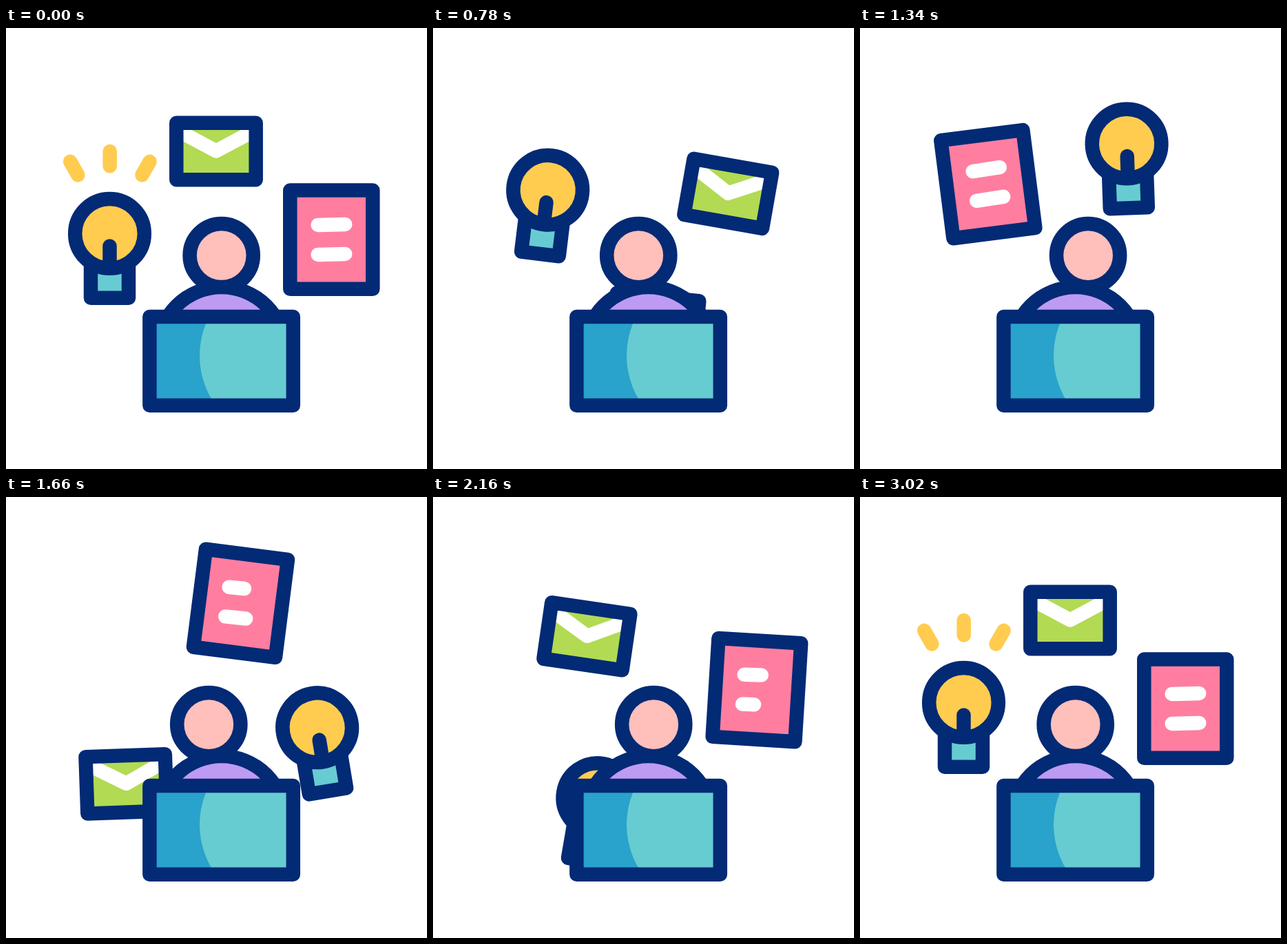
An HTML page with a canvas that plays this animation: 611x640 px, repeating every 3.42 s.

```html
<!DOCTYPE html>
<html lang="en">
<head>
<meta charset="utf-8">
<title>Juggling tasks</title>
<style>
html, body { margin: 0; width: 100%; height: 100%; overflow: hidden; background: #fff; }
canvas { display: block; width: 611px; height: 640px; }
</style>
</head>
<body>
<canvas id="stage"></canvas>
<script>
const W = 611, H = 640, LOOP = 3420, STEP = 20, STROKE = 20.5;
const ORBIT = 154.5, ORBIT_TIME = 2400;
const C = {
  navy: '#032a75', yellow: '#ffcc50', green: '#b2da53', teal: '#67ccd1',
  blue: '#29a2cc', pink: '#ff7ea0', skin: '#ffbfba', purple: '#bd9bf3', white: '#fff'
};
const canvas = document.getElementById('stage');
const ctx = canvas.getContext('2d');
const dpr = window.devicePixelRatio || 1;
canvas.width = Math.round(W * dpr);
canvas.height = Math.round(H * dpr);

const ease = u => {
  u = Math.min(1, Math.max(0, u));
  return u * u * (3 - 2 * u);
};

// Eased value through [time, value] keys
function keyed(t, keys) {
  for (let i = 1; i < keys.length; i++) {
    const [t0, v0] = keys[i - 1], [t1, v1] = keys[i];
    if (t < t1) return v0 + (v1 - v0) * ease((t - t0) / (t1 - t0));
  }
  return keys[keys.length - 1][1];
}

function paint(fill, stroke = C.navy) {
  if (fill) {
    ctx.fillStyle = fill;
    ctx.fill();
  }
  if (stroke) {
    ctx.strokeStyle = stroke;
    ctx.stroke();
  }
}

function rect(x, y, w, h, fill, stroke) {
  ctx.beginPath();
  ctx.rect(x, y, w, h);
  paint(fill, stroke);
}

function circle(x, y, r, fill, stroke) {
  ctx.beginPath();
  ctx.arc(x, y, r, 0, Math.PI * 2);
  paint(fill, stroke);
}

function line(color, ...points) {
  ctx.beginPath();
  points.forEach(([x, y]) => ctx.lineTo(x, y));
  paint(null, color);
}

// Draws the part of a line between fractions a and b
function trimmed(color, [x0, y0], [x1, y1], a, b) {
  if (b - a < 0.002) return;
  const at = k => [x0 + (x1 - x0) * k, y0 + (y1 - y0) * k];
  line(color, at(a), at(b));
}

// One lap clockwise from the rest position, rocking on the way
const TILT = [[0, 0], [600, 10], [1200, -10], [1800, 10], [2400, 0]];
function orbit(t, start, x, y, angle, draw) {
  const s = Math.max(0, t - start);
  const a0 = angle * Math.PI / 180;
  const a = a0 + Math.PI * 2 * ease(s / ORBIT_TIME);
  ctx.save();
  ctx.translate(x + ORBIT * (Math.cos(a) - Math.cos(a0)), y + ORBIT * (Math.sin(a) - Math.sin(a0)));
  ctx.rotate(keyed(s, TILT) * Math.PI / 180);
  draw();
  ctx.restore();
}

function drawPage(t) {
  rect(-60, -71.6, 120, 143.2, C.pink);
  const s = t < ORBIT_TIME ? t % 1200 : 0;
  [[-21.2, 0], [21.8, 60]].forEach(([y, lag]) => {
    const shown = keyed(s - lag, [[260, 1], [700, 0], [1140, 1]]);
    trimmed(C.white, [-19.6, y], [19.9, y - 1], 0, s - lag < 260 ? 1 : shown);
  });
}

function drawMail() {
  rect(-57.7, -41.2, 115.4, 82.4, C.green, null);
  line(C.white, [-57.7, -31.2], [0, -0.5], [57.7, -31.2]);
  rect(-57.7, -41.2, 115.4, 82.4, null);
}

function drawBulb() {
  rect(-27.5, 18, 55, 53.8, C.teal);
  circle(0, -21.6, 50.3, C.yellow);
  line(C.navy, [0, -3.6], [0, 24]);
}

function drawRays(t) {
  const gone = ease(t / 400), grown = ease((t - 2800) / 200);
  const [a, b] = t < 1000 ? [gone, 1] : [0, grown];
  trimmed(C.yellow, [104.4, 213.4], [93.2, 193.8], a, b);
  trimmed(C.yellow, [150.7, 200.6], [150.7, 178.9], a, b);
  trimmed(C.yellow, [197.4, 213.4], [208.6, 193.8], a, b);
}

const SWAY = [[0, 0], [600, -25.4], [1200, 25.4], [1800, -25.4], [2400, 25.4], [3000, 0]];
function drawPerson(t) {
  circle(312.7 + keyed(t, SWAY), 330.1, 46.1, C.skin);
  ctx.save();
  ctx.beginPath();
  ctx.rect(200, 340, 230, 90);
  ctx.clip();
  circle(312.7, 468.2, 92.1, C.purple);
  ctx.restore();
}

function drawLaptop() {
  const box = [208.4, 419, 208.4, 128.8];
  rect(...box, C.blue, null);
  ctx.save();
  ctx.beginPath();
  ctx.rect(...box);
  ctx.clip();
  circle(404.2, 475.5, 123.2, C.teal, null);
  ctx.restore();
  rect(...box, null);
}

function render(t) {
  ctx.setTransform(canvas.width / W, 0, 0, canvas.height / H, 0, 0);
  ctx.fillStyle = C.white;
  ctx.fillRect(0, 0, W, H);
  ctx.lineWidth = STROKE;
  ctx.lineCap = ctx.lineJoin = 'round';
  drawRays(t);
  orbit(t, 0, 472.3, 307.1, 0, () => drawPage(t));
  orbit(t, 200, 305, 179, -90, drawMail);
  orbit(t, 400, 150.5, 320, 180, drawBulb);
  drawPerson(t);
  drawLaptop();
}

const begin = performance.now();
function tick() {
  const t = (performance.now() - begin) % LOOP;
  render(Math.floor(t / STEP) * STEP);
  requestAnimationFrame(tick);
}
tick();
</script>
</body>
</html>
```
